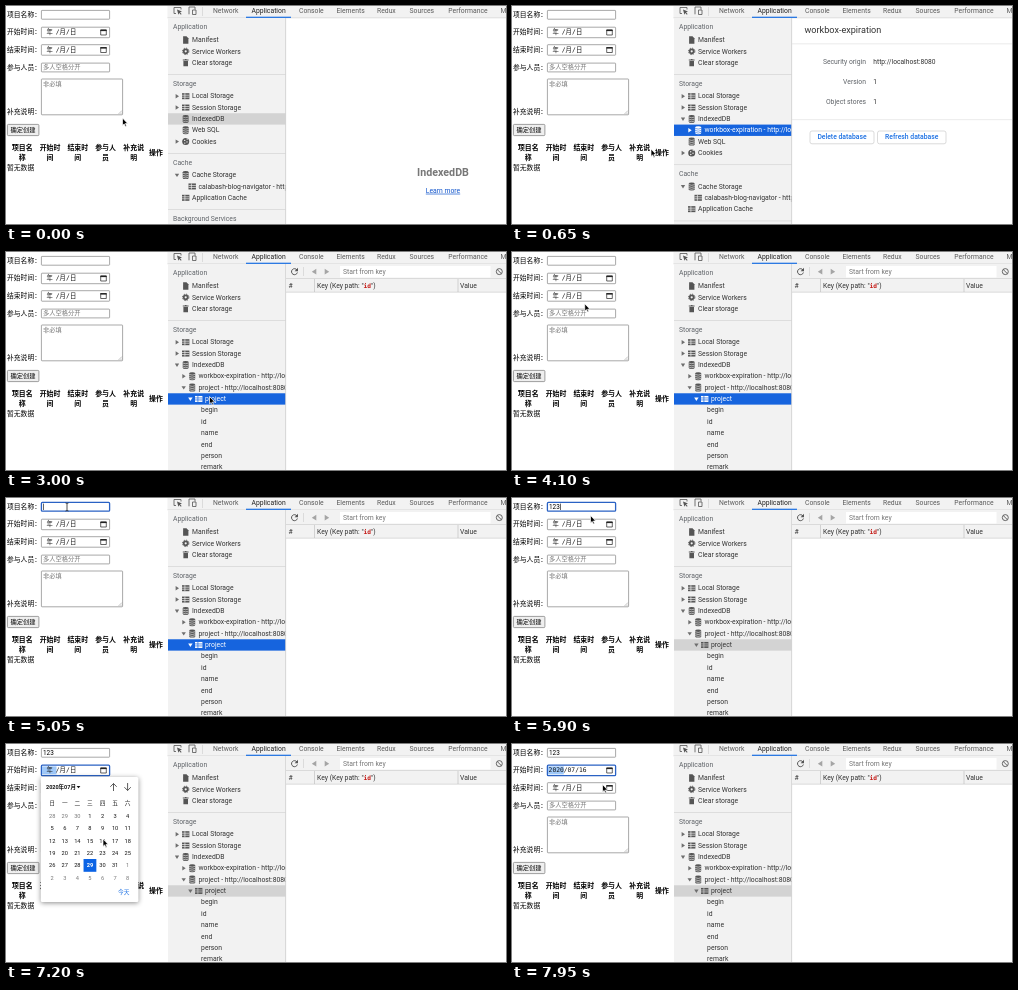
These frames come from a looping animation (500 px wide and 218 px high, 8000 ms). An HTML page:

```html
<!DOCTYPE html>
<html lang="zh-CN">
<head>
<meta charset="utf-8">
<title>IndexedDB project form</title>
<style>
html, body { margin: 0; height: 100%; overflow: hidden; background: #fff; }
svg { display: block; width: 100vw; height: 100vh; }
text { font-family: Roboto, "Noto Sans CJK SC", "Noto Sans CJK", sans-serif; }
.mono { font-family: "DejaVu Sans Mono", "Noto Sans CJK SC", "Noto Sans CJK", monospace; }
.popup { filter: drop-shadow(0 1px 2.5px rgba(0, 0, 0, .45)); }
</style>
</head>
<body>
<svg viewBox="0 0 500 218">
  <defs><clipPath id="side"><rect x="162" y="13" width="117.5" height="205"/></clipPath></defs>
  <g id="scene"></g>
  <path id="arrow" d="M0 0V7.4L1.7 5.9 2.8 8.4 4 7.9 2.9 5.5H5.2Z" stroke="#fff" stroke-width=".7"/>
  <path id="beam" d="M-1.5-4Q0-4 0-3V3Q0 4-1.5 4M1.5-4Q0-4 0-3M0 3Q0 4 1.5 4" fill="none" stroke="#222" stroke-width=".8"/>
</svg>
<script>
const LOOP = 8000, ROW = 11.35, BLUE = '#1a6fe3', SELECT = '#1664de', INK = '#333', PANEL = '#f2f2f2';
const $ = id => document.getElementById(id);

const rect = (x, y, w, h, fill, more = '') =>
  `<rect x="${x}" y="${y}" width="${w}" height="${h}" fill="${fill}" ${more}/>`;
const path = (d, color, width = .8, fill = 'none') =>
  `<path d="${d}" fill="${fill}" stroke="${color}" stroke-width="${width}"/>`;
const shape = (d, color) => path(d, 'none', 0, color);
// y is the visual middle of the line
const text = (x, y, s, size = 6.8, fill = INK, more = '') =>
  `<text x="${x}" y="${y + size * .32}" font-size="${size}" fill="${fill}" ${more}>${s}</text>`;
const MID = 'text-anchor="middle" ', END = 'text-anchor="end"', BOLD = 'font-weight="700"';

const icons = {
  db: (c, bg) => shape('M-3-2.8A3 1.2 0 0 1 3-2.8V2.8A3 1.2 0 0 1-3 2.8Z', c) +
    path('M-3-1.9Q0-.4 3-1.9M-3 .2Q0 1.7 3 .2M-3 2.1Q0 3.6 3 2.1', bg, .6),
  table: (c, bg) => rect(-3.7, -3, 7.4, 6, c) +
    path('M-3.7-1H3.7M-3.7 1H3.7M-.8-3V3', bg, .7),
  file: c => shape('M-2.6-3.7H.8L2.7-1.8V3.7H-2.6Z', c),
  gear: (c, bg) => `<circle r="2.8" fill="${c}"/><circle r="3.2" fill="none" stroke="${c}" stroke-width="1" stroke-dasharray="1.3 1.21"/><circle r="1.1" fill="${bg}"/>`,
  trash: c => shape('M-2.3-1.8H2.3V3.6H-2.3ZM-2.9-3.2H-1L-.6-3.8H.6L1-3.2H2.9V-2.3H-2.9Z', c),
  cookie: (c, bg) => `<circle r="3.5" fill="${c}"/>` +
    [[-1, -1.2], [1.3, .3], [-.9, 1.5], [1.5, -2.6]].map(p => `<circle cx="${p[0]}" cy="${p[1]}" r=".7" fill="${bg}"/>`).join('')
};

function field(x, y, w, h, focused) {
  return rect(x + .4, y + .4, w - .8, h - .8, '#fff', focused
    ? 'rx="1" stroke="#2a62c4" stroke-width="1.3"'
    : 'rx=".6" stroke="#858585" stroke-width=".7"');
}

function dateField(y, focused, picked) {
  const mid = y + 5.6, s = (x, v) => text(x, mid, v, 6.3, '#111', 'class="mono"');
  let out = field(35, y, 69, 11.3, focused);
  if (focused) out += rect(36, y + 1.6, picked ? 15.8 : 14.5, 8, '#9fc8f8');
  out += picked ? s(36.6, '2020/07/16')
    : s(40.5, '年') + s(49.8, '/') + s(53.5, '月') + s(59.9, '/') + s(64, '日');
  return out + path(`M94.7 ${mid - 2.4}h5.6v5h-5.6z`, '#222', .7) +
    rect(94.4, mid - 2.8, 6.2, 1.5, '#222');
}

function form(s) {
  const labels = [['项目名称', 8.8], ['开始时间', 26.3], ['结束时间', 44], ['参与人员', 61.5], ['补充说明', 106.3]];
  const heads = [[16.3, '项目名', '称'], [44, '开始时', '间'], [71.8, '结束时', '间'], [99.5, '参与人', '员'], [127.7, '补充说', '明']];
  let out = labels.map(([v, y]) => text(1, y, v + '：', 6.8, '#000')).join('');
  out += field(35, 4, 69, 9.6, s.focus == 'name') + text(37, 8.9, s.typed, 6.4, '#000');
  if (s.focus == 'name') out += rect(37.2 + s.typed.length * 3.6, 5.6, .6, 6.4, '#000');
  out += dateField(20.8, s.focus == 'date', s.picked) + dateField(38.3);
  out += field(35, 56.7, 69, 9.6) + text(37, 61.5, '多人空格分开', 6.24, '#757575');
  out += field(35, 72.6, 82, 36.6) + text(37, 78.2, '非必填', 6.24, '#757575');
  out += path('M112.5 108L116 104.5M114.5 108L116 106.5', '#888', .5);
  out += rect(1.4, 118.4, 31.5, 11.2, '#efefef', 'rx="1" stroke="#777" stroke-width=".7"') +
    text(4.6, 124, '确定创建', 6.24, '#000');
  for (const [x, a, b] of heads)
    out += text(x, 142, a, 6.9, '#000', MID + BOLD) + text(x, 151.3, b, 6.9, '#000', MID + BOLD);
  return out + text(150, 146.6, '操作', 6.9, '#000', MID + BOLD) + text(1, 162, '暂无数据', 6.8, '#000');
}

function picker() {
  let out = rect(34.8, 33, 97.6, 125, '#fff', 'rx="1.5" class="popup"');
  out += text(40, 43, '2020年07月', 5.5, '#111', BOLD) + shape('M70.6 42H74.4L72.5 44.2Z', '#111');
  out += path('M107.5 47V39.6M104.3 42.8L107.5 39.5 110.7 42.8M121.6 39V46.4M118.4 43.2L121.6 46.5 124.8 43.2', '#333', .8);
  [...'日一二三四五六'].forEach((d, i) => out += text(46.2 + i * 12.58, 58.7, d, 5.7, '#222', MID));
  for (let i = 0; i < 42; i++) {
    const day = new Date(2020, 5, 28 + i), x = 46.2 + i % 7 * 12.58, y = 72 + Math.floor(i / 7) * 12.35;
    const inside = day.getMonth() == 6, today = i == 31;
    if (today) out += rect(x - 6.4, y - 6.4, 12.8, 12.8, '#0b63e5');
    out += text(x, y, day.getDate(), 5.7, today ? '#fff' : inside ? '#111' : '#777', MID + (today ? BOLD : ''));
  }
  return out + text(117.7, 148.5, '今天', 5.7, BLUE, MID);
}

function sidebar(s) {
  // [label, icon, depth, arrow, chosen]; a plain string is a section heading
  const items = ['Application', ['Manifest', 'file', 0], ['Service Workers', 'gear', 0], ['Clear storage', 'trash', 0],
    'Storage', ['Local Storage', 'table', 0, 'right'], ['Session Storage', 'table', 0, 'right'],
    ['IndexedDB', 'db', 0, s.open && 'down', s.selected == 'root']];
  if (s.open) items.push(['workbox-expiration - http://localhost:8080', 'db', 1, 'right', s.selected == 'workbox']);
  if (s.listed) items.push(['project - http://localhost:8080', 'db', 1, s.expanded ? 'down' : 'right']);
  if (s.expanded) items.push(['project', 'table', 2, s.indexes ? 'down' : 'right', s.selected == 'store']);
  if (s.indexes) for (const key of ['begin', 'id', 'name', 'end', 'person', 'remark']) items.push([key, '', 1.4]);
  items.push(['Web SQL', 'db', 0], ['Cookies', 'cookie', 0, 'right'],
    'Cache', ['Cache Storage', 'db', 0, 'down'], ['calabash-blog-navigator - http://localhost:8080', 'table', 1],
    ['Application Cache', 'table', 0], 'Background Services');

  let out = '', y = 0;
  for (const item of items) {
    if (typeof item == 'string') {
      y += y ? 20.8 : 21.3;
      if (y > 30) out += rect(162, y - 9.3, 118, .6, '#d0d0d0');
      out += text(167, y, item, 6.8, '#5f6368');
      y += 12.7 - ROW;
      continue;
    }
    y += ROW;
    const [label, icon, depth, arrow, chosen] = item, lit = chosen && s.active;
    const bg = lit ? SELECT : chosen ? '#d3d3d3' : PANEL, ink = lit ? '#fff' : '#555';
    if (chosen) out += rect(162, y - ROW / 2, 118, ROW, bg);
    if (arrow) out += `<g transform="translate(${171 + depth * 6.7} ${y})">` +
      shape(arrow == 'down' ? 'M-2.2-1.4H2.2L0 2Z' : 'M-1.4-2.2V2.2L2 0Z', lit ? '#fff' : '#6e6e6e') + '</g>';
    if (icon) out += `<g transform="translate(${179.7 + depth * 6.5} ${y})">${icons[icon](ink, bg)}</g>`;
    out += text(186 + depth * 6.5, y, label, 6.8, lit ? '#fff' : INK);
  }
  return rect(162, 12, 118, 206, PANEL) + `<g clip-path="url(#side)">${out}</g>` + rect(279.4, 12, .7, 206, '#c8c8c8');
}

function tabs() {
  const names = [[207, 'Network'], [245.5, 'Application'], [293, 'Console'], [330.5, 'Elements'],
    [371, 'Redux'], [403.5, 'Sources'], [442.3, 'Performance'], [494.5, 'Memory']];
  return rect(161.5, 0, 339, 12, PANEL) + rect(161.5, 11.6, 339, .6, '#ccc') +
    rect(240, 10.7, 45, 1.2, BLUE) + rect(196, 1, .6, 9, '#ccc') +
    path('M170 7.5H168V1.5H175V3.5', '#555', .8) + shape('M171 3.5L176 5.5 174 6.3 175.6 8.1 174.9 8.7 173.3 7 172.4 8.7Z', '#555') +
    path('M183 8.3V1H189V3.5M186.5 4H190V8.5H186.5Z', '#555', .8) +
    names.map(([x, n]) => text(x, 4.8, n, 6.8, n == 'Application' ? '#222' : '#5a5a5a')).join('');
}

const welcome = () => text(437, 166.3, 'IndexedDB', 10.7, '#777', MID + BOLD) +
  text(437, 184.5, 'Learn more', 6.8, '#1155cc', MID + 'text-decoration="underline"');

function database() {
  const facts = [['Security origin', 'http://localhost:8080'], ['Version', '1'], ['Object stores', '1']];
  const button = (x, w, v) => rect(x, 125, w, 12.8, '#fff', 'rx="2" stroke="#ccc" stroke-width=".7"') +
    text(x + w / 2, 131.3, v, 6.8, BLUE, MID + 'font-weight="500"');
  return text(292.5, 24, 'workbox-expiration', 9.1) + rect(280, 37.6, 220, .6, '#ddd') +
    facts.map(([k, v], i) => text(354, 55.7 + i * 20.2, k, 6.8, '#5f6368', END) + text(361.3, 55.7 + i * 20.2, v, 6.7)).join('') +
    rect(280, 113.5, 220, .6, '#ddd') + button(298, 64, 'Delete database') + button(365.5, 68.5, 'Refresh database');
}

function store() {
  return rect(280, 12.2, 220, 27.8, PANEL) + rect(280, 26.3, 220, .6, '#ccc') + rect(280, 39.8, 220, .6, '#c4c4c4') +
    path('M291 18A3 3 0 1 0 291.4 20.5', '#555', 1) + shape('M292 15.8V19.2H288.6Z', '#555') +
    rect(297.3, 15, .6, 9, '#ccc') +
    shape('M310.3 16.8V22.6L305.8 19.7Z', '#a5a5a5') + shape('M318.7 16.8V22.6L323.2 19.7Z', '#a5a5a5') +
    rect(334, 14, 150.5, 11.4, '#fff') + text(337, 19.7, 'Start from key', 6.8, '#757575') +
    '<circle cx="493.3" cy="19.6" r="3" fill="none" stroke="#555" stroke-width=".9"/>' + path('M491.2 17.5L495.4 21.7', '#555', .9) +
    rect(308, 27, .6, 13, '#bbb') + rect(451.7, 27, .6, 13, '#bbb') +
    text(282.5, 33.4, '#') + text(311, 33.4, 'Key (Key path: "<tspan class="mono" font-size="6.2" font-weight="700" fill="#c41a16">id</tspan>")') +
    text(454, 33.4, 'Value');
}

const tooltip = () => rect(181.3, 141, 38, 12.8, '#f1f1f1', 'stroke="#bbb" stroke-width=".6"') +
  text(184.3, 147.3, 'Version: 1', 6.8, '#222');

function stateAt(t) {
  return {
    open: t >= 400, listed: t >= 1600, expanded: t >= 2500, indexes: t >= 2850,
    selected: t < 500 ? 'root' : t < 2700 ? 'workbox' : 'store',
    active: t >= 400 && t < 5100,
    tip: t >= 2050 && t < 2450,
    focus: t < 5000 ? '' : t < 6150 ? 'name' : 'date',
    typed: '123'.slice(0, t < 5400 ? 0 : t < 5500 ? 1 : t < 5650 ? 2 : 3),
    picking: t >= 6200 && t < 7400, picked: t >= 7400
  };
}

const panels = { root: welcome, workbox: database, store };
const draw = s => form(s) + tabs() + sidebar(s) + panels[s.selected]() +
  (s.tip ? tooltip() : '') + (s.picking ? picker() : '');

// pointer stops: time, x, y
const stops = [[100, 116.5, 112], [350, 171, 112], [480, 196, 123], [650, 139, 143], [950, 150, 145],
  [1450, 408, 130], [1750, 408, 130], [2050, 177, 133.5], [2450, 177, 133.5], [2700, 203.5, 144.5], [3300, 203.5, 144.5],
  [3700, 150, 100], [4150, 70, 50], [4800, 61, 9], [5700, 61, 9], [6100, 96, 26], [6250, 96, 26],
  [6500, 94, 40], [6650, 94, 40], [7200, 97, 95], [7450, 97, 95], [7900, 90.5, 40.5]];

function pointerAt(t) {
  const i = stops.findIndex(p => p[0] > t);
  if (i < 1) return (i ? stops[stops.length - 1] : stops[0]).slice(1);
  const [a, b] = [stops[i - 1], stops[i]], u = (t - a[0]) / (b[0] - a[0]), e = u * u * (3 - 2 * u);
  return [a[1] + (b[1] - a[1]) * e, a[2] + (b[2] - a[2]) * e];
}

let last = '';
function frame(now) {
  const t = Math.floor(now % LOOP / 50) * 50, s = stateAt(t), key = JSON.stringify(s);
  if (key != last) { $('scene').innerHTML = draw(s); last = key; }
  const [x, y] = pointerAt(t), typing = x > 35 && x < 104 && y < 14;
  for (const [id, on] of [['arrow', !typing], ['beam', typing]]) {
    $(id).setAttribute('transform', `translate(${x} ${y})`);
    $(id).style.display = on ? '' : 'none';
  }
  requestAnimationFrame(frame);
}
frame(performance.now());
</script>
</body>
</html>
```
